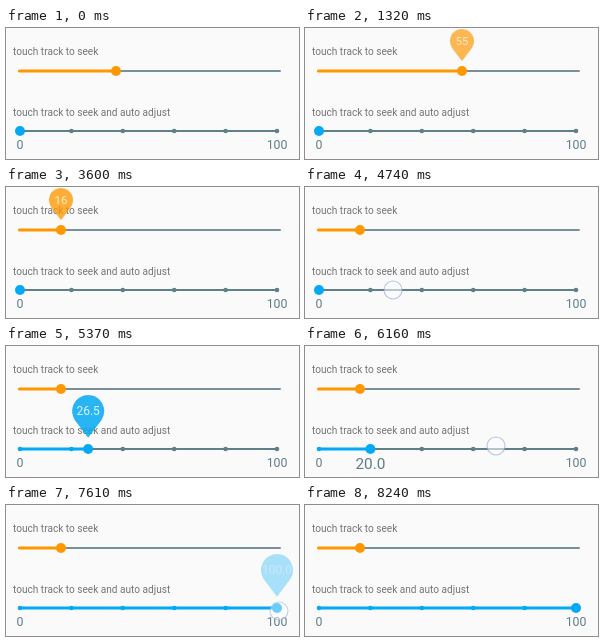
An HTML page with a canvas that plays this animation: 293x131 px, repeating every 9.29 s.

```html
<!DOCTYPE html>
<html lang="en">
<head>
<meta charset="utf-8">
<title>Seek bars</title>
<style>
  html, body { margin: 0; width: 100%; height: 100%; overflow: hidden; background: #fafafa; }
  canvas { display: block; width: 293px; height: 131px; }
</style>
</head>
<body>
<canvas id="stage"></canvas>
<script>
const W = 293, H = 131, LOOP = 9290;
const JUMP = 100, SHOWN = 320;
const canvas = document.getElementById('stage');
const ctx = canvas.getContext('2d');
const scale = Math.max(1, window.devicePixelRatio || 1);
canvas.width = W * scale;
canvas.height = H * scale;

const plain = {
  left: 13.5, right: 274, y: 43, rest: 110,
  color: '#ff9800', track: '#78909c', r: 5,
  bubbleY: 13, bubbleR: 12, bubbleFont: 11.5,
  label: x => String(Math.round((x - 13) / 2.62)),
  taps: [
    { at: 750, x: 157, y: 45.5, hide: [1230, 1510] },
    { at: 1870, x: 231, y: 42.5, hide: [2410, 2580] },
    { at: 3060, x: 55, y: 43.5, hide: [3540, 3820] }
  ]
};

const snapping = {
  left: 14, right: 271, y: 103, rest: 14,
  color: '#03a9f4', track: '#5f8086', r: 5,
  bubbleY: 65, bubbleR: 16, bubbleFont: 12,
  label: x => ((x - 14) / 2.57).toFixed(1),
  taps: [
    { at: 4740, x: 88, y: 103, snap: 65.4, hide: [5270, 5660] },
    { at: 6160, x: 191, y: 100, snap: 168.2, hide: [6600, 6990] },
    { at: 7420, x: 271, y: 106, touchX: 273, snap: 271, hide: [7850, 8230] }
  ]
};

const clamp = v => Math.min(1, Math.max(0, v));
const span = (t, a, b) => clamp((t - a) / (b - a));
const smooth = v => (1 - Math.cos(Math.PI * v)) / 2;
const mix = (a, b, v) => a + (b - a) * v;

function line(x1, x2, y, width, color) {
  ctx.beginPath();
  ctx.moveTo(x1, y);
  ctx.lineTo(x2, y);
  ctx.lineWidth = width;
  ctx.lineCap = 'round';
  ctx.strokeStyle = color;
  ctx.stroke();
}

function dot(x, y, r, color) {
  ctx.beginPath();
  ctx.arc(x, y, r, 0, Math.PI * 2);
  ctx.fillStyle = color;
  ctx.fill();
}

function text(str, x, y, size, color, align = 'center') {
  ctx.font = `${size}px Roboto, sans-serif`;
  ctx.textAlign = align;
  ctx.fillStyle = color;
  ctx.fillText(str, x, y);
}

function bubble(bar, x, alpha) {
  if (alpha <= 0) return;
  const r = bar.bubbleR, y = bar.bubbleY, dx = r * Math.sqrt(3) / 2, dy = r / 2;
  const tip = y + r * 5 / 3;
  ctx.globalAlpha = alpha;
  ctx.beginPath();
  ctx.moveTo(x, tip);
  ctx.quadraticCurveTo(x - dx - 1.4, y + dy - 1.4, x - dx, y + dy);
  ctx.arc(x, y, r, Math.PI * 5 / 6, Math.PI / 6);
  ctx.quadraticCurveTo(x + dx + 1.4, y + dy - 1.4, x, tip);
  ctx.fillStyle = bar.color;
  ctx.fill();
  text(bar.label(x), x, y + bar.bubbleFont * 0.36, bar.bubbleFont, '#fff');
  ctx.globalAlpha = 1;
}

function touch(tap, t) {
  if (t < tap.at) return;
  const alpha = 1 - span(t, tap.at + 160, tap.at + 290);
  if (alpha <= 0) return;
  ctx.globalAlpha = alpha;
  dot(tap.touchX || tap.x, tap.y, 9, 'rgba(250,252,255,.55)');
  ctx.lineWidth = 1.2;
  ctx.strokeStyle = 'rgba(135,155,205,.55)';
  ctx.stroke();
  ctx.globalAlpha = 1;
}

// Thumb place, bubble opacity and thumb text visibility at time t.
function pose(bar, t) {
  const s = { x: bar.rest, alpha: 0, settled: true };
  for (const tap of bar.taps) {
    if (t < tap.at + JUMP) break;
    const [from, to] = tap.hide;
    const out = span(t, from, to);
    s.x = tap.snap ? mix(tap.x, tap.snap, out) : tap.x;
    s.alpha = smooth(span(t, tap.at + JUMP + 10, tap.at + SHOWN)) *
      (1 - (tap.snap ? smooth(out) : out));
    s.settled = out === 0 || out === 1;
  }
  return s;
}

function drawBar(bar, s) {
  line(s.x, bar.right, bar.y, 2, bar.track);
  line(bar.left, s.x, bar.y, 3.2, bar.color);
}

function draw(t) {
  ctx.setTransform(scale, 0, 0, scale, 0, 0);
  ctx.fillStyle = '#fafafa';
  ctx.fillRect(0, 0, W, H);

  const a = pose(plain, t), b = pose(snapping, t);
  text('touch track to seek', 7, 27, 10.1, '#757575', 'left');
  text('touch track to seek and auto adjust', 7, 87.5, 10.1, '#757575', 'left');

  drawBar(plain, a);
  dot(a.x, plain.y, plain.r, plain.color);

  drawBar(snapping, b);
  for (let i = 0; i <= 5; i++) {
    const x = mix(snapping.left, snapping.right, i / 5);
    dot(x, snapping.y, 2.3, x <= b.x + 0.1 ? snapping.color : snapping.track);
  }
  dot(b.x, snapping.y, snapping.r, snapping.color);

  text('0', 14, 121.3, 12.3, '#607d8b');
  text('100', 271, 121.3, 12.3, '#607d8b');
  if (b.settled && b.x > snapping.left && b.x < snapping.right) {
    text(snapping.label(b.x), b.x, 122.8, 15.4, '#607d8b');
  }

  bubble(plain, a.x, a.alpha);
  bubble(snapping, b.x, b.alpha);
  for (const tap of [...plain.taps, ...snapping.taps]) touch(tap, t);
}

const start = performance.now();
function tick() {
  draw((performance.now() - start) % LOOP);
  requestAnimationFrame(tick);
}
tick();
</script>
</body>
</html>
```
